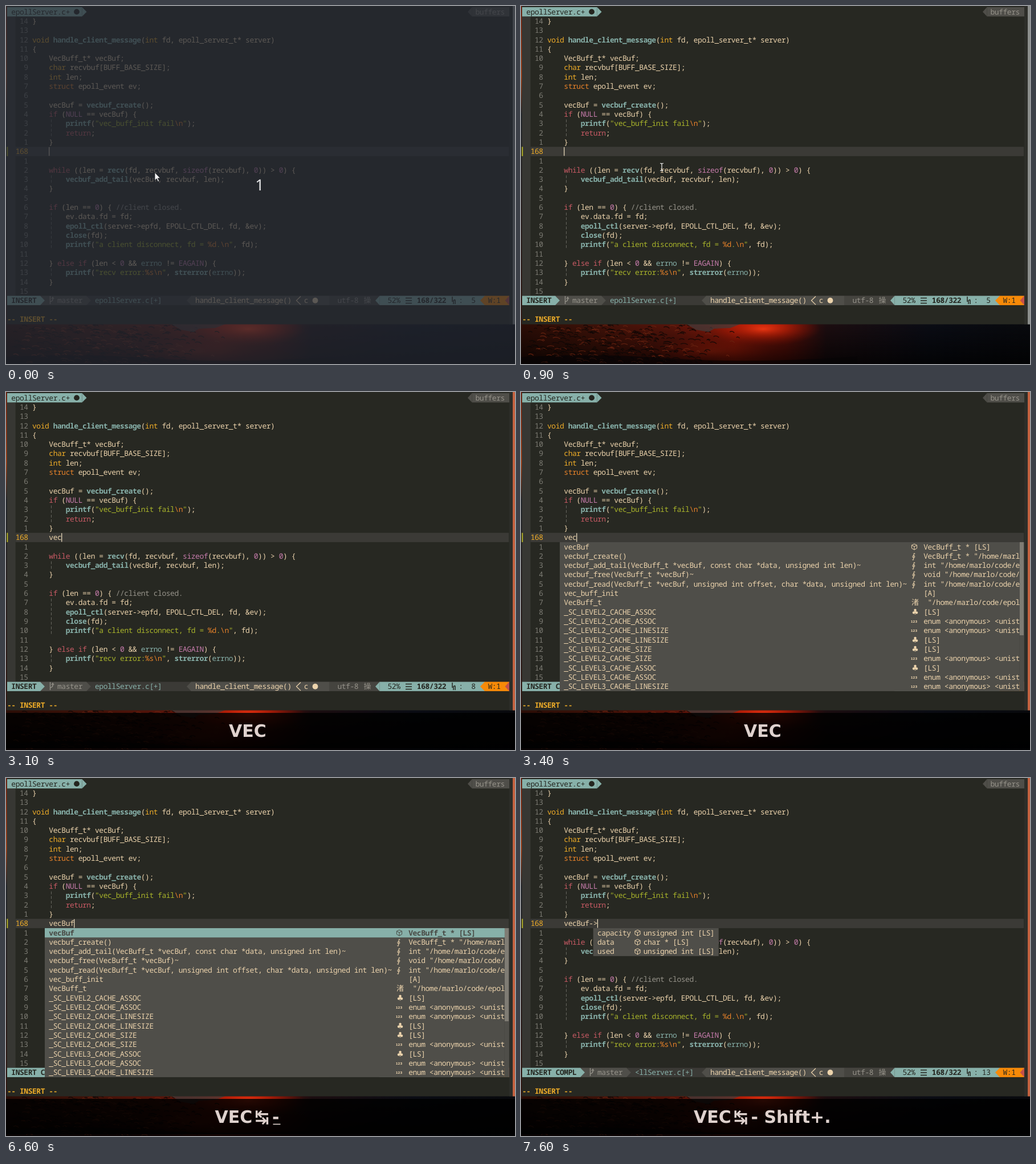
An HTML page for the animation above (8 s loop, 893 by 627 pixels).

```html
<!DOCTYPE html>
<html lang="en">
<head>
<meta charset="utf-8">
<title>Editor completion</title>
<style>
html, body { margin: 0; width: 100%; height: 100%; overflow: hidden; background: #000; }
svg { display: block; width: 100%; height: 100%; }
text { white-space: pre; text-rendering: geometricPrecision; }
.mono { font: 13px "Noto Sans Mono", "Noto Sans CJK JP", "DejaVu Sans Mono", monospace; letter-spacing: -.465px; }
.icon { font: 13px "DejaVu Sans", "Noto Sans CJK JP", sans-serif; text-anchor: middle; }
.key { font: bold 30px "DejaVu Sans", sans-serif; fill: #dfd2ce; }
.count { font: 27px "Noto Sans", sans-serif; fill: #e4e5e6; text-anchor: middle; }
.bold { font-weight: bold; }
</style>
</head>
<body>
<svg id="stage" viewBox="0 0 893 627" preserveAspectRatio="none">
  <defs>
    <linearGradient id="sky">
      <stop offset="0" stop-color="#2c0d06"/><stop offset=".12" stop-color="#3a1108"/>
      <stop offset=".3" stop-color="#57140a"/><stop offset=".42" stop-color="#8f1808"/>
      <stop offset=".52" stop-color="#5c0f08"/><stop offset=".6" stop-color="#1c0d10"/>
      <stop offset=".8" stop-color="#0a0c14"/><stop offset="1" stop-color="#08090d"/>
    </linearGradient>
    <linearGradient id="shade" x2="0" y2="1">
      <stop offset="0" stop-color="#000" stop-opacity="0"/>
      <stop offset="1" stop-color="#000" stop-opacity=".72"/>
    </linearGradient>
    <linearGradient id="edge" x2="0" y2="1">
      <stop offset="0" stop-color="#7a2410"/><stop offset=".22" stop-color="#b8481a"/>
      <stop offset=".34" stop-color="#20242c"/><stop offset="1" stop-color="#30100a"/>
    </linearGradient>
    <radialGradient id="glow">
      <stop offset="0" stop-color="#ff3a14"/><stop offset=".4" stop-color="#d42408" stop-opacity=".7"/>
      <stop offset="1" stop-color="#a01404" stop-opacity="0"/>
    </radialGradient>
  </defs>
</svg>
<script>
(() => {
const CW = 7.335, RH = 16.31, LOOP = 8000;
const C = {
  bg: '#272822', line: '#3b3a36', pop: '#4f4e49', fg: '#ecd3ac', dim: '#7c7b73', mute: '#96938a',
  blue: '#87b0a9', dark: '#24251f', yellow: '#eeac28', red: '#c75a64', purple: '#c77cac',
  green: '#a9b42b', orange: '#e8822a', warn: '#f78a08'
};
const X = col => 2 + col * CW;
const Y = row => 2 + row * RH;
const base = row => Y(row) + 12.6;

const stage = document.getElementById('stage');
function add(parent, tag, attrs, text) {
  const el = document.createElementNS('http://www.w3.org/2000/svg', tag);
  for (const k in attrs) el.setAttribute(k, attrs[k]);
  if (text !== undefined) el.textContent = text;
  return parent.appendChild(el);
}
const group = (parent = stage) => add(parent, 'g', {});
const box = (g, x, y, w, h, fill, extra) =>
  add(g, 'rect', { x, y, width: w, height: h, fill, ...extra });
const path = (g, d, fill, extra) => add(g, 'path', { d, fill, ...extra });
const put = (g, row, col, str, fill = C.fg, bold = false) =>
  add(g, 'text', { class: bold ? 'mono bold' : 'mono', x: X(col), y: base(row), fill }, str);
const icon = (g, row, x, str, fill, size = 13) =>
  add(g, 'text', { class: 'icon', x, y: base(row), fill, style: `font-size:${size}px` }, str);
const show = (el, on) => el.setAttribute('display', on ? 'inline' : 'none');

// Segment of a bar; tip > 0 points right, tip < 0 points left
function seg(g, row, x0, x1, fill, tip = 0) {
  const y = Y(row);
  box(g, x0, y, x1 - x0, RH, fill);
  if (tip) {
    const x = tip > 0 ? x1 : x0;
    path(g, `M${x} ${y}l${tip} ${RH / 2}L${x} ${y + RH}z`, fill);
  }
}
const dot = (g, row, x, fill) =>
  add(g, 'circle', { cx: x, cy: Y(row) + RH / 2, r: 4.9, fill });
function cube(g, row, x, stroke) {
  const y = Y(row) + RH / 2;
  path(g, `M${x} ${y - 5}l4.6 2.2v5.4l-4.6 2.6l-4.6 -2.6v-5.4zM${x - 4.6} ${y - 2.8}l4.6 2.4l4.6 -2.4M${x} ${y - .4}v5.6`,
    'none', { stroke, 'stroke-width': 1 });
}

// Wallpaper
function wallpaper() {
  const g = group();
  box(g, 0, 0, 893, 627, '#0c0b0e');
  box(g, 0, 0, 2, 558, 'url(#edge)');
  box(g, 0, 557, 893, 70, 'url(#sky)');
  let seed = 7;
  const rnd = () => (seed = seed * 16807 % 2147483647) / 2147483647;
  add(g, 'ellipse', { cx: 425, cy: 566, rx: 100, ry: 30, fill: 'url(#glow)' });
  add(g, 'ellipse', { cx: 330, cy: 605, rx: 110, ry: 24, fill: 'url(#glow)', opacity: .4 });
  box(g, 0, 557, 893, 70, 'url(#shade)');
  for (let i = 0; i < 420; i++) {
    const x = rnd() * rnd() * 120 + rnd() * 280, y = 558 + rnd() * 68, w = 4 + rnd() * 9;
    path(g, `M${x.toFixed(1)} ${y.toFixed(1)}q${(w / 2).toFixed(1)} -3 ${w.toFixed(1)} ${(rnd() * 2).toFixed(1)}`, 'none',
      { stroke: rnd() < .72 ? '#0d0706' : '#6a2412', 'stroke-width': 1.3, opacity: .8 });
  }
  path(g, 'M290 557h95l-18 7l-28 1l-10 6l-22 -4z', '#3e3c3c', { opacity: .7 });
  path(g, 'M0 615q120 -8 260 2t330 -3v13h-590z', '#060405', { opacity: .6 });
}

// Code colouring
const SYNTAX = new RegExp([
  '(?<green>"[^"]*")', '(?<mute>//.*)', '(?<yellow>\\b(?:void|int|char)\\b)', '(?<orange>\\bstruct\\b)',
  '(?<red>\\b(?:if|else|while|return)\\b)', '(?<purple>\\b(?:NULL|EAGAIN|sizeof|\\d+)\\b)',
  '(?<blue>\\berrno\\b)', '(?<call>\\b\\w+(?=\\())'
].join('|'), 'g');

function code(g, row, src) {
  let at = 0;
  const emit = (str, fill, bold) => {
    const lead = str.length - str.trimStart().length;
    if (str.trim()) put(g, row, 6 + at + lead, str.trim(), fill, bold);
    at += str.length;
  };
  let last = 0;
  for (const m of src.matchAll(SYNTAX)) {
    emit(src.slice(last, m.index), C.fg);
    last = m.index + m[0].length;
    const kind = Object.keys(m.groups).find(k => m.groups[k] !== undefined);
    if (kind === 'green') m[0].split(/(%[ds]|\\n)/).forEach((s, i) => emit(s, i % 2 ? C.orange : C.green));
    else emit(m[0], C[kind] || C.blue, kind === 'call');
  }
  emit(src.slice(last), C.fg);
}

const SOURCE = `}

void handle_client_message(int fd, epoll_server_t* server)
{
    VecBuff_t* vecBuf;
    char recvbuf[BUFF_BASE_SIZE];
    int len;
    struct epoll_event ev;

    vecBuf = vecbuf_create();
    if (NULL == vecBuf) {
        printf("vec_buff_init fail\\n");
        return;
    }


    while ((len = recv(fd, recvbuf, sizeof(recvbuf), 0)) > 0) {
        vecbuf_add_tail(vecBuf, recvbuf, len);
    }

    if (len == 0) { //client closed.
        ev.data.fd = fd;
        epoll_ctl(server->epfd, EPOLL_CTL_DEL, fd, &ev);
        close(fd);
        printf("a client disconnect, fd = %d.\\n", fd);

    } else if (len < 0 && errno != EAGAIN) {
        printf("recv error:%s\\n", strerror(errno));
    }
`.split('\n');

wallpaper();
const term = group();
box(term, 1.5, 0, 891.5, 557.5, C.bg);
box(term, 2, Y(1), X(2) - 2, RH * 30, '#373733');
box(term, X(2), Y(15), X(120) - X(2), RH, C.line);
box(term, 883, 0, 6, 557.5, '#2d2e29');
const edge = box(term, 889, 0, 4, 557.5, '#8c8f8c');
box(term, 1.5, Y(15), 1.8, RH, '#bcbb26');

SOURCE.forEach((src, i) => {
  const row = i + 1, n = Math.abs(row - 15);
  const num = n ? String(n) : '168';
  put(term, row, 5 - num.length, num, n ? C.dim : C.yellow);
  if (src.startsWith('        '))
    add(term, 'line', { x1: 79.5, x2: 79.5, y1: Y(row) + 1, y2: Y(row) + RH,
      stroke: '#66655e', 'stroke-dasharray': '5 3' });
  code(term, row, src);
});
put(term, 33, 0, '-- INSERT --', C.yellow, true);

// Tab line
seg(term, 0, 2, 133.5, C.blue, 8);
put(term, 0, 1, 'epollServer.c+', C.dark);
dot(term, 0, 124, C.dark);
seg(term, 0, 817.5, 883, C.pop, -7.5);
put(term, 0, 112, 'buffers', C.mute);

// Status line
seg(term, 31, 2, 883, C.line);
function leftBar(mode, file, shift) {
  const g = group(term), s = shift * CW;
  seg(g, 31, 60 + s, 141 + s, C.pop, 8);
  seg(g, 31, 2, 60 + s, C.blue, 8);
  put(g, 31, 1, mode, C.dark, true);
  path(g, `M${77.5 + s} 508v14M${77.5 + s} 518q5 -1 4.5 -6m-2 1l2 -3l2 3`, 'none', { stroke: C.mute, 'stroke-width': 1.3 });
  put(g, 31, 12 + shift, 'master', C.mute);
  put(g, 31, 21 + shift, file, C.blue);
  return g;
}
const barInsert = leftBar('INSERT', 'epollServer.c[+]', 0);
const barCompl = leftBar('INSERT COMPL', '<llServer.c[+]', 6);
seg(term, 31, 325, 567, C.pop, -8);
put(term, 31, 45, 'handle_client_message()');
path(term, 'M517 508.5l-7.5 7.3l7.5 7.3', 'none', { stroke: C.fg, 'stroke-width': 1.2 });
put(term, 31, 71, 'c');
dot(term, 31, 542.5, C.fg);
seg(term, 31, 567, 656, '#45443f');
put(term, 31, 79, 'utf-8', C.mute);
icon(term, 31, 634, '操', C.mute);
seg(term, 31, 655.5, 840, C.blue, -7.5);
put(term, 31, 91, '52%', C.dark);
path(term, 'M701 511.5h11M701 516h11M701 520.5h11', 'none', { stroke: C.dark, 'stroke-width': 1.4 });
put(term, 31, 98, '168/322', C.dark, true);
path(term, 'M783 509v9M785 522v-6q3 -3 3 0v6', 'none', { stroke: C.dark, 'stroke-width': 1.5 });
put(term, 31, 108, ':', C.dark);
const colNum = add(term, 'text', { class: 'mono', x: X(112), y: base(31), fill: C.dark, 'text-anchor': 'end' });
seg(term, 31, 840, 883, C.warn, -8);
put(term, 31, 115, 'W:1', C.dark);
path(term, `M883 ${Y(31)}l-7.5 ${RH / 2}l7.5 ${RH / 2}z`, '#c4504a');

// Typed text and caret
const typedText = put(term, 15, 10, '');
const caret = box(term, 75, Y(15) + .5, 1.2, RH - 1, '#f4e4c4');

// Completion menus
const HOME = '"/home/marlo/code/epollServer';
const LS = '[LS]', ENUM = 'enum <anonymous> <unistd>';
const CACHE = [['2', 'ASSOC', 0], ['2', 'ASSOC', 1], ['2', 'LINESIZE', 1], ['2', 'LINESIZE', 0], ['2', 'SIZE', 0],
  ['2', 'SIZE', 1], ['3', 'ASSOC', 0], ['3', 'ASSOC', 1], ['3', 'LINESIZE', 1]];
const ITEMS = [
  ['vecBuf', 'cube', 'VecBuff_t * [LS]'],
  ['vecbuf_create()', '∮', 'VecBuff_t * ' + HOME],
  ['vecbuf_add_tail(VecBuff_t *vecBuf, const char *data, unsigned int len)~', '∮', 'int ' + HOME],
  ['vecbuf_free(VecBuff_t *vecBuf)~', '∮', 'void ' + HOME],
  ['vecbuf_read(VecBuff_t *vecBuf, unsigned int offset, char *data, unsigned int len)~', '∮', 'int ' + HOME],
  ['vec_buff_init', '', '[A]'],
  ['VecBuff_t', '渚', ' ' + HOME],
  ...CACHE.map(([lv, name, en]) => [`_SC_LEVEL${lv}_CACHE_${name}`, en ? '123' : '♣', en ? ENUM : LS])
];
function item(g, row, [word, mark, info], fill, bold) {
  put(g, row, 10, word, fill, bold);
  if (mark === 'cube') cube(g, row, 690, fill);
  else if (mark === '123') add(g, 'text', { class: 'icon bold', x: 689.5, y: base(row) - 2, fill, style: 'font-size:5.5px' }, mark);
  else icon(g, row, mark === '∮' ? 689 : 691.5, mark, fill, mark === '♣' ? 14 : 13);
  const lead = info.length - info.trimStart().length;
  put(g, row, 96 + lead, info.slice(lead, 23), fill, bold);
}
const menu = group();
box(menu, X(9), Y(16), X(119) - X(9), RH * 16, C.pop);
box(menu, X(119), Y(16), 8, RH * 16, C.pop);
box(menu, X(119), Y(16), 7, RH * 10, '#7f7c74');
ITEMS.forEach((it, i) => item(menu, 16 + i, it, C.fg));
const picked = group(menu);
box(picked, X(9), Y(16), X(119) - X(9), RH, C.blue);
item(picked, 16, ITEMS[0], '#484a45', true);

const fields = group();
box(fields, X(17), Y(16), X(47) - X(17), RH * 3, C.pop);
[['capacity', 'unsigned int [LS]'], ['data', 'char * [LS]'], ['used', 'unsigned int [LS]']].forEach(([name, type], i) => {
  put(fields, 16 + i, 18, name);
  cube(fields, 16 + i, 204.5, C.fg);
  put(fields, 16 + i, 29, type);
});

// Key display
const keys = group();
box(keys, 0, 562, 893, 62, '#000', { opacity: .84 });
const keyRow = group(keys);
const keyText = [0, 70, 100.5].map(x => add(keyRow, 'text', { class: 'key', x, y: 603.5 }));
const under = box(keyRow, 0, 605.6, 10, 1.6, '#dfd2ce');

// Pointer and opening countdown
const beam = path(stage, 'M-3 -6.5q3 0 3 1.5q0 -1.5 3 -1.5M0 -5v10M-3 6.5q3 0 3 -1.5q0 1.5 3 1.5', 'none',
  { stroke: '#f2f2f2', 'stroke-width': 1.2 });
const veil = box(stage, 0, 0, 893, 627, '#242932');
const intro = group();
path(intro, 'M261 291.5v14l3.3 -3l2.3 5.2l2.2 -1l-2.3 -5h4.3z', '#f4f4f4', { stroke: '#15181c', 'stroke-width': .8 });
add(intro, 'text', { class: 'count', x: 445, y: 323 }, '1');

// Timelines: [start, ...state]
const TYPED = [[0, ''], [2200, 'v'], [2600, 've'], [2800, 'vec'], [4400, 'vecBuf'], [6800, 'vecBuf-'], [7500, 'vecBuf->']];
// start, letters, tab, rest, total width, underline start, underline end time
const KEYS = [
  [2200, 'V', '', '', 23, 0, 2600], [2600, 'VE', '', '', 44, 23, 2800], [2800, 'VEC', '', '', 66, 44, 3100],
  [4300, 'VEC', '↹', '', 96, 71, 4500], [6600, 'VEC', '↹', '-', 115, 102, 6800],
  [7400, 'VEC', '↹', '- Shift+.', 242, 125, 7600]
];
const BEAM = [[200, 262, 292], [400, 270, 290], [500, 259.5, 286.5], [900, 247, 282]];
const pick = (list, t) => list.filter(s => s[0] <= t).pop();

function draw(t) {
  const typed = pick(TYPED, t)[1];
  typedText.textContent = typed;
  caret.setAttribute('x', X(10 + typed.length) - .2);
  colNum.textContent = 5 + typed.length;

  const big = t >= 3400 && t < 6800, small = t >= 7600;
  show(menu, big);
  show(picked, t >= 4400);
  show(fields, small);
  show(barCompl, big || small);
  show(barInsert, !big && !small);
  edge.setAttribute('fill', t < 2000 ? '#8c8f8c' : '#c4623f');

  const key = pick(KEYS, t);
  show(keys, !!key);
  if (key) {
    const [, letters, tab, rest, width, from, until] = key;
    [letters, tab, rest].forEach((s, i) => keyText[i].textContent = s);
    keyRow.setAttribute('transform', `translate(${424 - width / 2} 0)`);
    under.setAttribute('x', from);
    under.setAttribute('width', width - from);
    show(under, t < until);
  }

  const spot = pick(BEAM, t);
  show(beam, spot && t < 1400);
  if (spot) beam.setAttribute('transform', `translate(${spot[1]} ${spot[2]})`);
  veil.setAttribute('opacity', t < 100 ? .72 : t < 200 ? .35 : 0);
  show(intro, t < 100);
}

const start = performance.now();
function tick() {
  draw((performance.now() - start) % LOOP);
  requestAnimationFrame(tick);
}
draw(0);
tick();
})();
</script>
</body>
</html>
```
